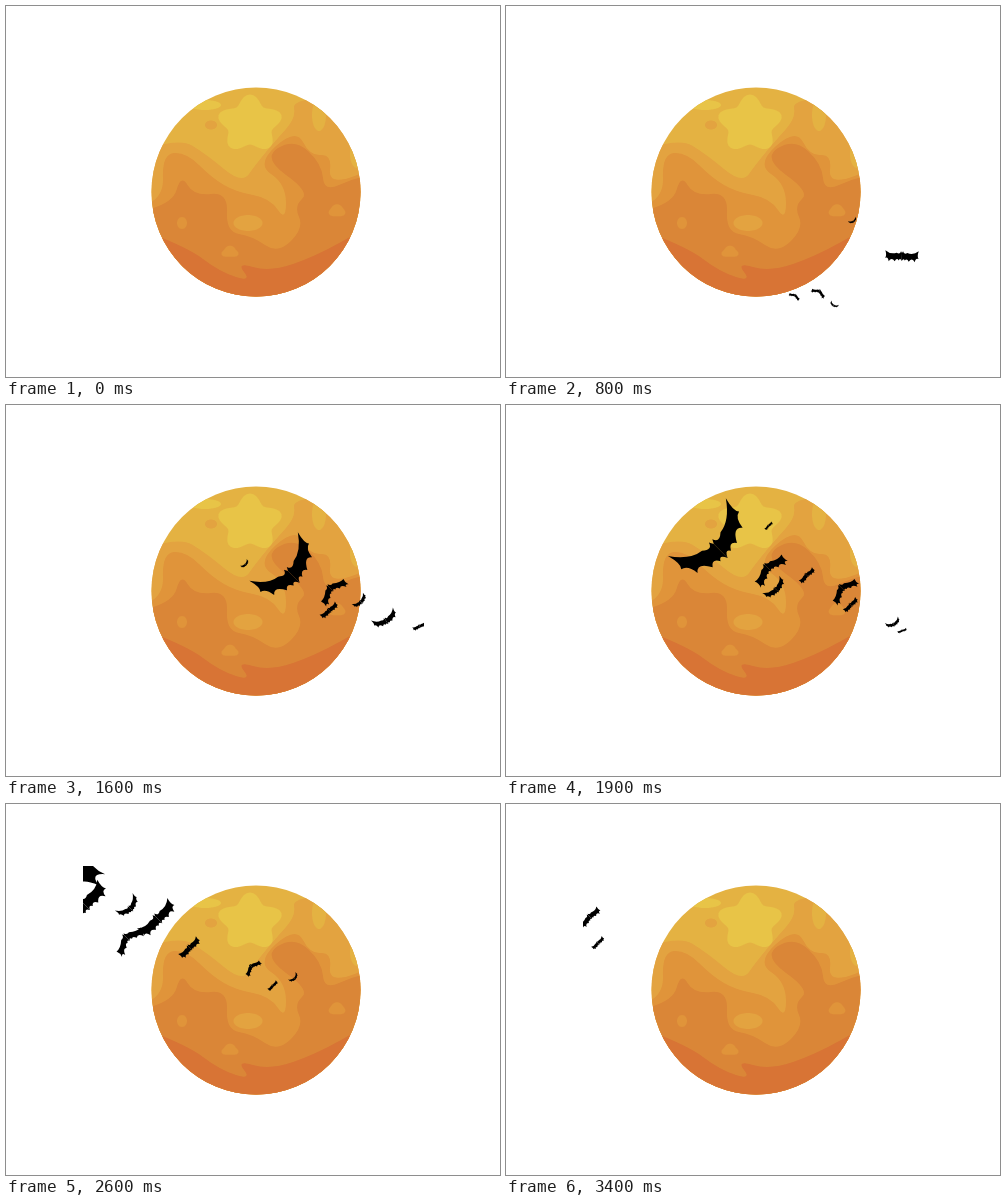
Write an HTML page with a canvas that moves like this. It is 494 px wide and 371 px high and loops after 3.5 s.

```html
<!DOCTYPE html>
<html lang="en">
<head>
<meta charset="utf-8">
<title>Bats and moon</title>
<style>
html, body { margin: 0; width: 100%; height: 100%; overflow: hidden; background: #fff; }
canvas { display: block; }
</style>
</head>
<body>
<canvas id="stage" width="494" height="371"></canvas>
<script>
const ctx = document.getElementById("stage").getContext("2d");
const LOOP = 3500, STEP = 100;
const TAU = Math.PI * 2;
const clamp = (v, lo, hi) => Math.max(lo, Math.min(hi, v));

const [BRIGHT, GOLD, AMBER, ORANGE, RUST, EMBER] =
  ["#e8c447", "#e4b242", "#e3a340", "#e0943a", "#da8637", "#d87435"];

// Fills everything below a smooth line led by a few points.
function layer(color, ...pts) {
  ctx.fillStyle = color;
  ctx.beginPath();
  ctx.moveTo(...pts[0]);
  for (let i = 1; i < pts.length - 1; i++) {
    const [x, y] = pts[i], [nx, ny] = pts[i + 1];
    ctx.quadraticCurveTo(x, y, (x + nx) / 2, (y + ny) / 2);
  }
  ctx.lineTo(...pts[pts.length - 1]);
  ctx.lineTo(375, 310);
  ctx.lineTo(130, 310);
  ctx.fill();
}

// Ellipse whose edge swells into lobes, the first one at the top.
function spot(color, x, y, rx, ry, lobes = 2, swell = 0) {
  ctx.fillStyle = color;
  ctx.beginPath();
  for (let a = 0; a < TAU; a += TAU / 60) {
    const r = 1 + swell * Math.cos(lobes * (a + TAU / 4));
    ctx.lineTo(x + rx * r * Math.cos(a), y + ry * r * Math.sin(a));
  }
  ctx.fill();
}

function drawMoon() {
  ctx.save();
  ctx.beginPath();
  ctx.arc(250, 186, 104.5, 0, TAU);
  ctx.clip();
  ctx.fillStyle = GOLD;
  ctx.fillRect(140, 76, 220, 220);
  spot(BRIGHT, 244, 118, 28, 25, 5, 0.18);
  spot(BRIGHT, 199, 99, 16, 5);
  spot(AMBER, 205, 119, 6, 4.5);

  layer(AMBER, [130, 146], [172, 131], [200, 148], [236, 178], [250, 158], [270, 134],
    [290, 112], [286, 92], [375, 92]);
  spot(GOLD, 313, 109, 7, 16);
  spot(GOLD, 351, 148, 7, 14);

  layer(ORANGE, [130, 202], [158, 196], [156, 148], [180, 146], [206, 172], [230, 186],
    [264, 192], [280, 216], [280, 178], [250, 158], [290, 122], [304, 150], [326, 148],
    [322, 180], [375, 160]);
  layer(RUST, [130, 206], [166, 200], [175, 168], [188, 190], [222, 186], [220, 226],
    [246, 230], [272, 248], [298, 222], [288, 200], [304, 186], [256, 152], [288, 132],
    [316, 158], [318, 186], [348, 172], [375, 168]);
  spot(ORANGE, 176, 217, 5, 6);
  spot(AMBER, 242, 217, 14.5, 8);
  spot(ORANGE, 224, 246, 8, 5.5, 3, 0.15);
  spot(ORANGE, 331, 205, 8, 6, 3, 0.12);
  layer(EMBER, [130, 222], [180, 240], [214, 266], [246, 276], [230, 256], [264, 266],
    [310, 250], [360, 222]);
  ctx.restore();
}

// The unit bat spans 1; flap bends both wings up or down.
function drawBat({ x, y, span, angle, flap }) {
  ctx.save();
  ctx.translate(x, y);
  ctx.rotate(angle * Math.PI / 180);
  ctx.fillStyle = "#000";
  for (const side of [-span, span]) {
    const at = (u, depth) => [u * side, span * (depth - flap * 0.27 * Math.pow(2 * u, 1.5))];
    const curve = (cu, cd, u, d) => ctx.quadraticCurveTo(...at(cu, cd), ...at(u, d));
    ctx.beginPath();
    ctx.moveTo(...at(0, 0.24));
    ctx.lineTo(...at(0, 0));
    ctx.lineTo(...at(0.03, -0.05));
    curve(0.06, 0.06, 0.16, 0.01);
    curve(0.34, 0.1, 0.5, 0);
    curve(0.45, 0.14, 0.5, 0.23);
    curve(0.41, 0.17, 0.39, 0.31);
    curve(0.31, 0.15, 0.21, 0.27);
    curve(0.15, 0.15, 0.09, 0.23);
    curve(0.05, 0.14, 0, 0.24);
    ctx.fill();
  }
  ctx.restore();
}

// Each bat grows evenly along its path and beats its wings at its own pace.
const bats = [];
const fly = (from, to, beat, peak, ...path) => bats.push({ from, to, beat, peak, path });

fly(7, 95, 290, 1600, [200, 308, 302], [800, 396, 247], [1200, 354, 208], [1600, 282, 166],
  [2200, 129, 113]);
fly(6, 53, 267, 1200, [400, 280, 303], [800, 314, 284], [1200, 353, 241], [1600, 322, 181],
  [2200, 184, 141], [2600, 75, 97]);
fly(8, 43, 187, 127, [600, 277, 300], [1200, 319, 262], [1600, 379, 214], [2200, 262, 149],
  [2600, 149, 112]);
fly(7, 25, 257, 800, [600, 308, 307], [1200, 362, 275], [1600, 354, 196], [2200, 230, 147],
  [2600, 123, 103]);
fly(8, 11, 257, 800, [400, 402, 232], [1200, 292, 195], [1600, 239, 159], [2200, 292, 98],
  [2600, 288, 174], [3000, 80, 100]);
fly(12, 34, 267, 2200, [1000, 428, 228], [1600, 322, 204], [2200, 212, 160], [2600, 118, 131]);
fly(12, 25, 200, 50, [1400, 426, 236], [1600, 413, 220], [2200, 269, 177], [2600, 182, 142]);
fly(14, 24, 280, 2200, [1800, 408, 228], [2200, 325, 190], [2600, 244, 161], [3400, 82, 111]);
fly(9, 15, 200, 50, [1800, 414, 230], [2200, 341, 209], [2600, 266, 181], [3400, 91, 138]);

// Smooth through the path's points, straight on after the last one.
function along(path, t) {
  const last = path.length - 1;
  const slope = (a, b, c) => (b[c] - a[c]) / (b[0] - a[0]);
  const end = path[last];
  if (t >= end[0]) return [1, 2].map(c => end[c] + slope(path[last - 1], end, c) * (t - end[0]));
  const i = path.findLastIndex(k => k[0] <= t);
  const a = path[i], b = path[i + 1];
  const prev = path[Math.max(0, i - 1)], next = path[Math.min(last, i + 2)];
  const d = b[0] - a[0], p = (t - a[0]) / d, q = 1 - p;
  return [1, 2].map(c =>
    a[c] * q * q * (1 + 2 * p) + slope(prev, b, c) * d * p * q * q +
    b[c] * p * p * (1 + 2 * q) - slope(a, next, c) * d * p * p * q);
}

function pose({ from, to, beat, peak, path }, t) {
  const start = path[0][0], end = path[path.length - 1][0];
  const [x, y] = along(path, t);
  return {
    x, y,
    span: from + (to - from) * (t - start) / (end - start),
    angle: clamp(y - 245, -45, 30),
    flap: 0.2 + 0.9 * Math.cos(TAU * (t - peak) / beat)
  };
}

function draw(t) {
  ctx.fillStyle = "#fff";
  ctx.fillRect(0, 0, 494, 371);
  drawMoon();
  ctx.save();
  ctx.beginPath();
  ctx.rect(77, 62, 341, 247);
  ctx.clip();
  for (const bat of bats) if (t >= bat.path[0][0]) drawBat(pose(bat, t));
  ctx.restore();
}

const start = performance.now();
function tick() {
  const t = (performance.now() - start) % LOOP;
  draw(Math.floor(t / STEP) * STEP);
  requestAnimationFrame(tick);
}
tick();
</script>
</body>
</html>
```
